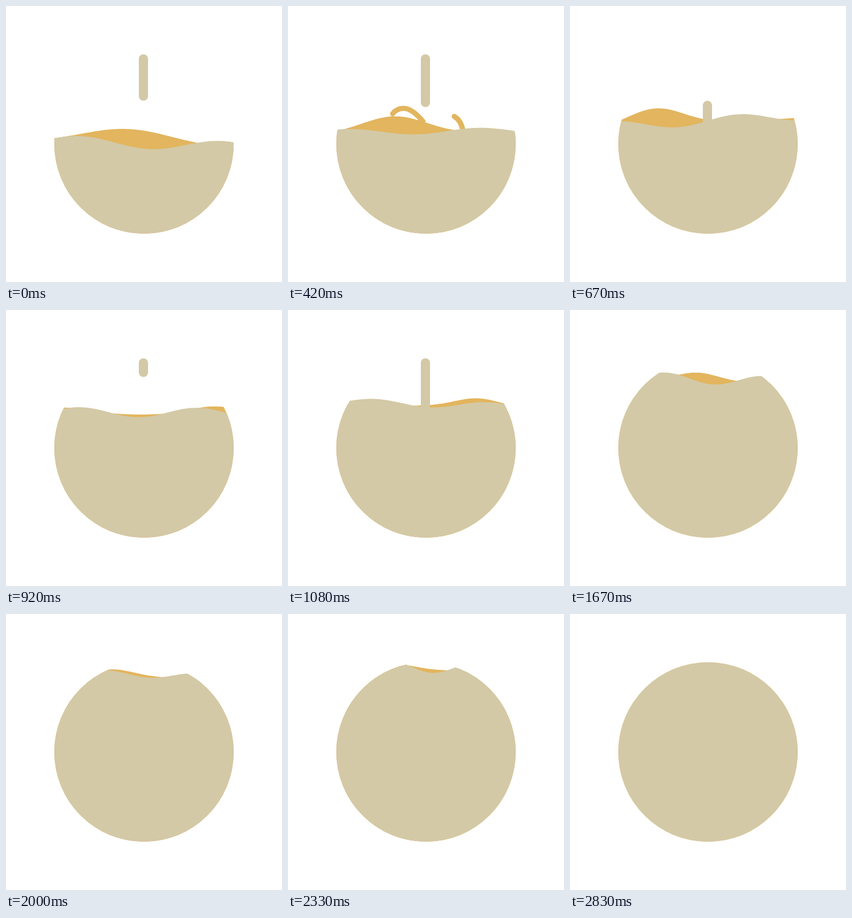
An HTML page that plays this animation: 480x480 px, repeating every 2910 ms.

```html
<!DOCTYPE html>
<html lang="en">
<head>
<meta charset="utf-8">
<title>Filling bowl</title>
<style>
  html, body { margin: 0; width: 100%; height: 100%; overflow: hidden; background: #fff; }
  svg { display: block; width: 100%; height: 100%; --green: #d3c9a6; --orange: #e2b55e; }
  #front { fill: var(--green); }
  #back { fill: var(--orange); }
  .line { fill: none; stroke-linecap: round; }
  .splash { stroke: var(--orange); stroke-width: 9; }
  #drops { stroke: var(--green); stroke-width: 16; }
</style>
</head>
<body>
<svg viewBox="0 0 480 480">
  <clipPath id="bowl"><circle cx="240" cy="240" r="156"/></clipPath>
  <path class="line splash" id="leftArc" pathLength="100"
    d="M239 206C228 192 215 178 201 178C190 178 184 184 181 189C178 197 176 206 176 216"/>
  <path class="line splash" id="rightArc" pathLength="100"
    d="M244 208C250 190 278 186 289 192C298 197 302 205 304 216"/>
  <g clip-path="url(#bowl)"><path id="back"/></g>
  <path class="line" id="drops"/>
  <g clip-path="url(#bowl)"><path id="front"/></g>
</svg>
<script>
const LOOP = 2910, FPS = 12, MID = 240, LEFT = 84, WIDTH = 312, TAU = 2 * Math.PI;
const $ = id => document.getElementById(id);
const clamp = (v, lo, hi) => Math.min(hi, Math.max(lo, v));
const bell = u => Math.exp(-u * u);

// One push to the left when the second drop lands
const slosh = t => bell((t - 640) / 260);

// Tilted waterline, rising with a gentle surge
const waterline = t => {
  const level = 234 - 0.0625 * t + 10 * Math.cos(TAU * (t - 380) / 2350);
  const tilt = 0.035 - 0.093 * slosh(t);
  return x => level + tilt * (x - MID);
};

function frontWave(t) {
  const base = waterline(t);
  const trough = 251 - 66 * slosh(t);
  const length = 245 - 0.045 * t;
  const height = 7.2 + 2 * Math.cos(TAU * t / 800);
  return x => base(x) + height * Math.cos(TAU * (x - trough) / length);
}

// Swells drift left, fading near the walls of the bowl
function backWave(t) {
  const base = waterline(t);
  const crest = 210 - 144 * (1 - Math.cos(Math.PI * t / 2200));
  const height = 29 - 0.0085 * t + 16 * slosh(t);
  const width = 48 + 64 * Math.exp(-t / 600);
  const swell = (x, c) =>
    Math.sqrt(Math.sin(Math.PI * clamp((c - LEFT) / WIDTH, 0, 1))) * bell((x - c) / width);
  return x => base(x) + 4 - height * (swell(x, crest) + swell(x, crest + 260));
}

function fillBelow(id, wave) {
  let d = "M80 480";
  for (let x = 80; x <= 400; x += 4) d += `L${x} ${wave(x).toFixed(2)}`;
  $(id).setAttribute("d", d + "V480Z");
}

function trim(id, t, headFrom, headTo, tailFrom, tailTo) {
  const path = $(id);
  const part = (a, b) => 100 * clamp((t - a) / (b - a), 0, 1);
  const head = part(headFrom, headTo), tail = part(tailFrom, tailTo);
  path.style.visibility = head > tail ? "visible" : "hidden";
  path.setAttribute("stroke-dasharray", `${Math.max(head - tail, 0.01)} 300`);
  path.setAttribute("stroke-dashoffset", -tail);
}

function drop(start, t) {
  const fall = s => clamp(92 + 0.45 * (t - s), 92, 260);
  const head = fall(start), tail = fall(start + 239);
  return t >= start && tail < head ? `M239 ${tail}V${head}` : "";
}

function draw(t) {
  fillBelow("front", frontWave(t));
  fillBelow("back", backWave(t));
  $("drops").setAttribute("d", [-144, 248, 880].map(s => drop(s, t)).join(""));
  trim("leftArc", t, 170, 520, 400, 650);
  trim("rightArc", t, 100, 400, 220, 525);
}

const begin = performance.now();
function tick() {
  const t = (performance.now() - begin) % LOOP;
  draw(Math.floor((t + 4) * FPS / 1000) * 1000 / FPS);
  requestAnimationFrame(tick);
}
tick();
</script>
</body>
</html>
```
